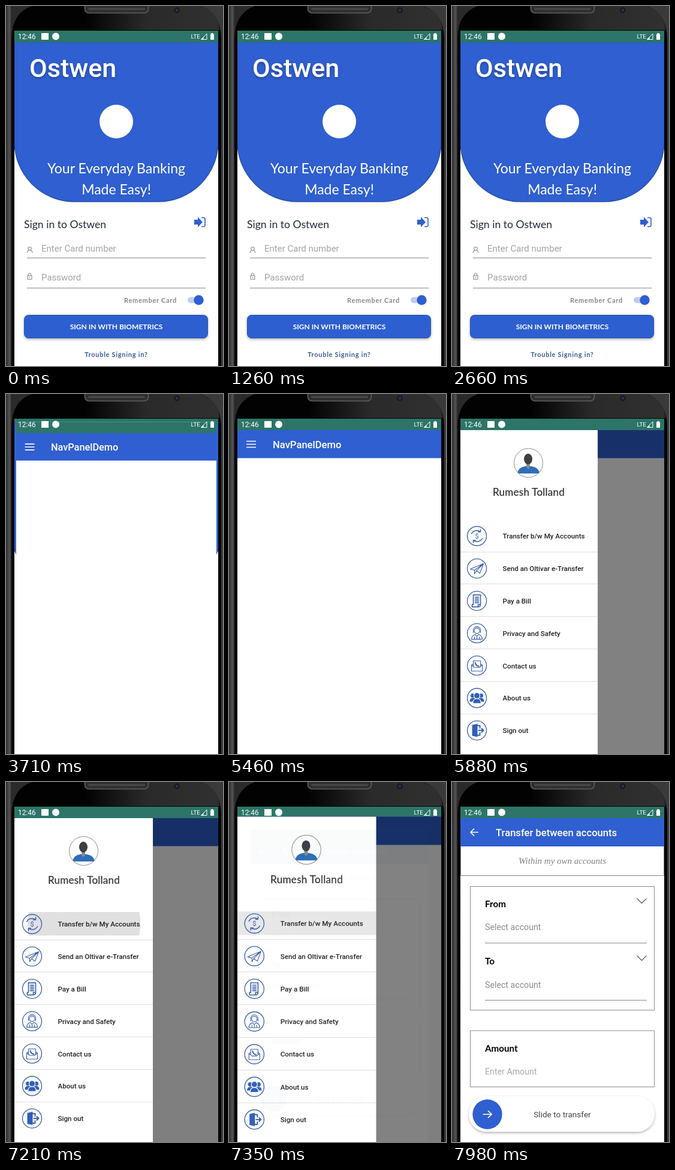
These frames come from a looping animation (362 px wide and 598 px high, 8 s). An HTML page:

```html
<!DOCTYPE html>
<html lang="en">
<head>
<meta charset="utf-8">
<title>Banking app</title>
<style>
html, body { margin: 0; width: 100%; height: 100%; overflow: hidden; background: #000; }
svg { display: block; width: 362px; height: 598px; }
text { font-family: Roboto, sans-serif; }
.lato { font-family: Lato, sans-serif; }
.bold { font-weight: 700; }
.medium { font-weight: 500; }
.small { font-size: 11px; letter-spacing: .72px; }
.mid { text-anchor: middle; }
.white { fill: #fff; }
.blue { fill: #2f5fd0; }
.edge { stroke: #2851ae; }
.teal { fill: #2c7568; }
.hint { fill: #a3a3a3; }
.line { fill: none; stroke: #8a8a8a; }
.icon { fill: none; stroke: #3a5fa8; stroke-width: 1.1; stroke-linecap: round; stroke-linejoin: round; }
.icon .solid { fill: #2f5fb8; stroke: none; }
.title { font-size: 16.6px; font-weight: 500; fill: #fff; }
.bars { fill: none; stroke: #fff; stroke-width: 1.7; }
</style>
</head>
<body>
<svg viewBox="0 0 362 598">
  <defs>
    <clipPath id="screen"><rect x="14" y="41" width="340" height="604"/></clipPath>
    <clipPath id="buttonClip"><rect x="30" y="513" width="307" height="39" rx="7"/></clipPath>
    <clipPath id="itemClip"><rect x="14" y="216" width="231" height="39"/></clipPath>
    <clipPath id="faceClip"><circle cx="129.500" cy="114.500" r="24"/></clipPath>
    <linearGradient id="rim"><stop stop-color="#2c2c2c"/><stop offset=".016" stop-color="#555"/><stop offset=".026" stop-color="#2a2a2a"/><stop offset="1" stop-color="#3a3a3a"/></linearGradient>
    <linearGradient id="glare"><stop offset=".35" stop-color="#020202"/><stop offset=".65" stop-color="#2a2a2a"/><stop offset="1" stop-color="#303030"/></linearGradient>
    <filter id="soft" x="-10%" y="-20%" width="120%" height="150%"><feDropShadow dx="0" dy="2" stdDeviation="2" flood-opacity=".3"/></filter>
  </defs>

  <!-- Phone body -->
  <rect width="362" height="598" fill="url(#rim)"/>
  <path d="M9 598V52Q11 4 58-4H310Q357 4 359 52V598Z" fill="#050505"/>
  <path d="M12 40Q14 5 58-4H310Q354 5 356 40Z" fill="url(#glare)"/>
  <rect x="131.500" y="-6" width="106" height="17.500" rx="7" fill="#2d2d2d" stroke="#555" stroke-width="2"/>
  <rect x="137" y="3" width="95" height="4" rx="2" fill="#444"/>
  <circle cx="285" cy="7" r="5" fill="#1b1b26"/><circle cx="285" cy="7" r="2" fill="#34345c"/>

  <g clip-path="url(#screen)">
    <g id="signIn">
      <rect x="14" y="41" width="340" height="604" fill="#fff"/>
      <path class="blue edge" d="M14 60H354V225A100 100 0 0 1 254 325H114A100 100 0 0 1 14 225Z" stroke-width="1.500"/>
      <rect class="teal" x="14" y="41" width="340" height="19.500"/>
      <text class="white medium" x="39" y="118" font-size="43" filter="url(#soft)">Ostwen</text>
      <circle class="white" cx="184" cy="192" r="28"/>
      <text class="lato white mid" x="184" y="278" font-size="23">Your Everyday Banking</text>
      <text class="lato white mid" x="184" y="313" font-size="23">Made Easy!</text>
      <text class="lato" x="30" y="369" font-size="17.600" fill="#222a3a">Sign in to Ostwen</text>
      <path class="blue" d="M314 355H320V350.500L328 359L320 367.500V363H314Z"/>
      <path d="M326 351.500H329.500Q332 351.500 332 354V364Q332 366.500 329.500 366.500H326" fill="none" stroke="#2f5fd0" stroke-width="1.600"/>
      <path class="line" d="M35 418.500H333M35 468.500H333"/>
      <g class="line" stroke-width="1.100">
        <circle cx="39.500" cy="403" r="2.800"/><path d="M35 410Q35.500 406.500 38 406M44 410Q43.500 406.500 41 406"/>
        <rect x="36" y="448" width="7" height="6"/><path d="M37.500 448V446a2 2 0 0 1 4 0V448M39.500 450V452"/>
      </g>
      <text class="hint" x="59" y="407.500" font-size="15">Enter Card number</text>
      <text class="hint" x="59" y="455.500" font-size="15">Password</text>
      <text class="lato bold small" x="197" y="493" fill="#858585">Remember Card</text>
      <rect x="303" y="483.500" width="24" height="10" rx="5" fill="#bccdf0"/>
      <circle class="blue" cx="321.500" cy="488.500" r="8.200"/>
      <rect class="blue edge" x="30.500" y="513.500" width="306" height="38" rx="7" filter="url(#soft)"/>
      <g clip-path="url(#buttonClip)"><circle id="buttonRipple" class="white" cx="184" cy="532"/></g>
      <text class="lato bold white mid" x="184" y="537" font-size="12">SIGN IN WITH BIOMETRICS</text>
      <text class="lato bold small mid" x="184" y="583" fill="#3a5c94">Trouble Signing in?</text>
    </g>

    <g id="home">
      <rect x="14" y="41" width="340" height="604" fill="#fff"/>
      <rect class="teal" x="14" y="41" width="340" height="19.500"/>
      <rect class="blue" x="14" y="60" width="340" height="46.500"/>
      <circle id="menuRipple" class="white" cx="37" cy="84"/>
      <path class="bars" d="M29 78.500H45M29 83.500H45M29 88.500H45"/>
      <text class="title" x="73" y="90">NavPanelDemo</text>
      <rect id="scrim" x="14" y="60" width="340" height="585"/>
      <g id="drawer">
        <rect x="14" y="60" width="231" height="585" fill="#fff"/>
        <g clip-path="url(#faceClip)">
          <path d="M111 132Q112 122 124 120H134Q147 122 148 132Z" fill="#2f6fb8"/>
          <path d="M126 116H132V121L129 125L126 121Z" fill="#8c8c8c"/>
          <ellipse cx="129" cy="108" rx="7" ry="9" fill="#3b3f46"/>
        </g>
        <circle class="line" cx="129.500" cy="114.500" r="24"/>
        <text class="lato mid" x="130" y="169" font-size="17" letter-spacing=".25" fill="#333" stroke="#333" stroke-width=".25">Rumesh Tolland</text>
        <g clip-path="url(#itemClip)"><circle id="itemRipple" cx="130" cy="235.500"/></g>
        <g id="items"></g>
      </g>
    </g>

    <g id="transfer">
      <rect x="14" y="41" width="340" height="604" fill="#fff"/>
      <rect class="teal" x="14" y="41" width="340" height="19.500"/>
      <rect class="blue" x="14" y="60" width="340" height="47"/>
      <path class="bars" d="M44 83.500H31M37 77.500L31 83.500L37 89.500"/>
      <text class="title" x="73" y="90">Transfer between accounts</text>
      <path class="line" d="M14.500 107V155.500H353.500V107"/>
      <text class="mid" x="184" y="136" font-size="15" fill="#808080" style="font-family:'Liberation Serif',serif;font-style:italic">Within my own accounts</text>
      <path class="line" d="M30.500 173.500H337.500V379H30.500ZM55 267.500H325M55 362.500H325M30.500 413H337.500V506.500H30.500Z"/>
      <path d="M308.500 193.500L316.500 201.500L324.500 193.500M308.500 288.500L316.500 296.500L324.500 288.500" fill="none" stroke="#555" stroke-width="1.200"/>
      <g class="bold" font-size="15.200">
        <text class="lato" x="55" y="208">From</text>
        <text class="lato" x="55" y="303">To</text>
        <text class="lato" x="55" y="448">Amount</text>
      </g>
      <g font-size="14.200" fill="#8d8d8d">
        <text x="55" y="246">Select account</text>
        <text x="55" y="341.500">Select account</text>
        <text x="55" y="486" fill="#aaa">Enter Amount</text>
      </g>
      <rect class="white" x="28" y="522" width="310" height="59" rx="29.500" filter="url(#soft)"/>
      <circle class="blue" cx="59" cy="552" r="24.700"/>
      <path class="bars" d="M51.500 552H66M60 546L66 552L60 558"/>
      <text class="mid" x="184" y="557" font-size="13.600" fill="#444">Slide to transfer</text>
    </g>

    <!-- Status bar -->
    <rect class="teal" x="14" y="41" width="340" height="5"/>
    <g class="white">
      <text x="20" y="55" font-size="11.900">12:46</text>
      <rect x="59" y="45" width="12" height="11"/>
      <circle cx="83" cy="50.500" r="6"/>
      <text x="308.500" y="54" font-size="9.800">LTE</text>
      <path d="M325.500 55.500L335 46V55.500Z" fill="none" stroke="#fff"/>
      <path d="M325 55.500L329.500 51V55.500Z"/>
      <path d="M341 46.500H342.500V45H345.500V46.500H347V56H341Z"/>
    </g>
  </g>
</svg>
<script>
const LOOP = 8000;
const $ = id => document.getElementById(id);
const clamp = v => Math.max(0, Math.min(1, v));
const span = (t, start, length) => clamp((t - start) / length);

// Menu labels with icons drawn around their own centre
const menu = [
  ['Transfer b/w My Accounts', '<path d="M-9-4A10 10 0 0 1 6-7M6-11V-7H2M9 4A10 10 0 0 1-6 7M-6 11V7H-2" stroke-width="1.500"/><text class="solid mid" y="4" font-size="11">$</text>'],
  ['Send an Oltivar e-Transfer', '<path d="M-11 1L11-8L5 8L-1 4L11-8L-4 3L-4 9L-1 4M-11 1L-4 3"/>'],
  ['Pay a Bill', '<path d="M-6-10H6V6Q6 10 2 10H-8V6H-6ZM-3-6H3M-3-3H3M-3 0H3M-3 3H3M2 10V6H6" stroke-width="1.600"/>'],
  ['Privacy and Safety', '<circle cy="-4" r="4.500"/><path d="M-6-3V-5A6 6 0 0 1 6-5V-3M-6-5V-1M6-5V-1M-9 10Q-9 4-3 2L0 5L3 2Q9 4 9 10ZM-4 10V6M4 10V6M0 5V10"/>'],
  ['Contact us', '<path d="M-9-1V9H9V-1L4 3H-4ZM-9-1L-6-3M9-1L6-3M-6 1V-8H6V1"/><path d="M-3-5Q-2 0 3 1" stroke-width="2"/>'],
  ['About us', '<g class="solid"><circle cx="-7" cy="-4" r="3.500"/><circle cx="7" cy="-4" r="3.500"/><path d="M-12 6Q-12 0-7 0H7Q12 0 12 6Z"/></g><g fill="#2f5fb8" stroke="#fff"><circle cy="-4" r="5"/><path d="M-7 9Q-7 1 0 1Q7 1 7 9Z"/></g>'],
  ['Sign out', '<path class="solid" d="M-8-9L1-11V11L-8 9Z"/><path d="M1-8H5V-4M5 4V8H1M3 0H11M8-3L11 0L8 3" stroke-width="2"/>']
];
$('items').innerHTML = menu.map(([label, icon], i) => {
  const y = 236 + i * 53.8;
  const rule = i < 6 ? `<path d="M14 ${Math.floor(y + 26) + .5}H245" stroke="#dedede"/>` : '';
  return `${rule}<g class="icon" transform="translate(43.500 ${y})"><circle r="16" stroke-width="1.300"/>${icon}</g>
    <text class="medium" x="86.500" y="${y + 4.300}" font-size="11.600" fill="#222">${label}</text>`;
}).join('');

const bezier = (u, a, b, c, d) => {
  const v = 1 - u;
  return a * v * v * v + 3 * b * v * v * u + 3 * c * v * u * u + d * u * u * u;
};

// Fast out, extra slow in: two joined cubic curves
function pageEase(p) {
  const [xs, ys] = p < 1 / 6
    ? [[0, .05, .1333, 1 / 6], [0, 0, .06, .4]]
    : [[1 / 6, .2083, .25, 1], [.4, .82, 1, 1]];
  let low = 0, high = 1;
  for (let i = 0; i < 20; i++) {
    const mid = (low + high) / 2;
    if (bezier(mid, ...xs) < p) low = mid; else high = mid;
  }
  return bezier(low, ...ys);
}

function setPage(id, scale, opacity) {
  const page = $(id);
  page.setAttribute('transform', `translate(184 343) scale(${scale}) translate(-184 -343)`);
  page.setAttribute('opacity', opacity);
}

function openPage(from, to, t, start) {
  const p = span(t, start, 400), e = pageEase(p);
  setPage(from, 1 + .05 * e, p < 1 ? 1 : 0);
  setPage(to, .85 + .15 * e, clamp((p * 400 - 50) / 50));
}

function ripple(id, radius, opacity) {
  $(id).setAttribute('r', radius);
  $(id).setAttribute('opacity', opacity);
}

function render(t) {
  if (t < 5000) {
    openPage('signIn', 'home', t, 3570);
    setPage('transfer', 1, 0);
  } else {
    setPage('signIn', 1, 0);
    openPage('home', 'transfer', t, 7300);
  }
  const open = 1 - (1 - span(t, 5566, 512)) ** 5;
  $('drawer').setAttribute('transform', `translate(${-231 * (1 - open)} 0)`);
  $('drawer').setAttribute('visibility', open ? 'visible' : 'hidden');
  $('scrim').setAttribute('opacity', .5 * open);

  ripple('buttonRipple', 165 * span(t, 3150, 350), .22 * span(t, 3150, 80) * (1 - span(t, 3450, 250)));
  ripple('menuRipple', 22 * span(t, 5460, 220), .22 * span(t, 5460, 80) * (1 - span(t, 5580, 220)));
  ripple('itemRipple', 40 + 54 * span(t, 6930, 280) + 60 * span(t, 7210, 200),
    .12 * span(t, 6930, 80) * (1 - span(t, 7300, 250)));
}

function tick() {
  render(performance.now() % LOOP);
  requestAnimationFrame(tick);
}
tick();
</script>
</body>
</html>
```
